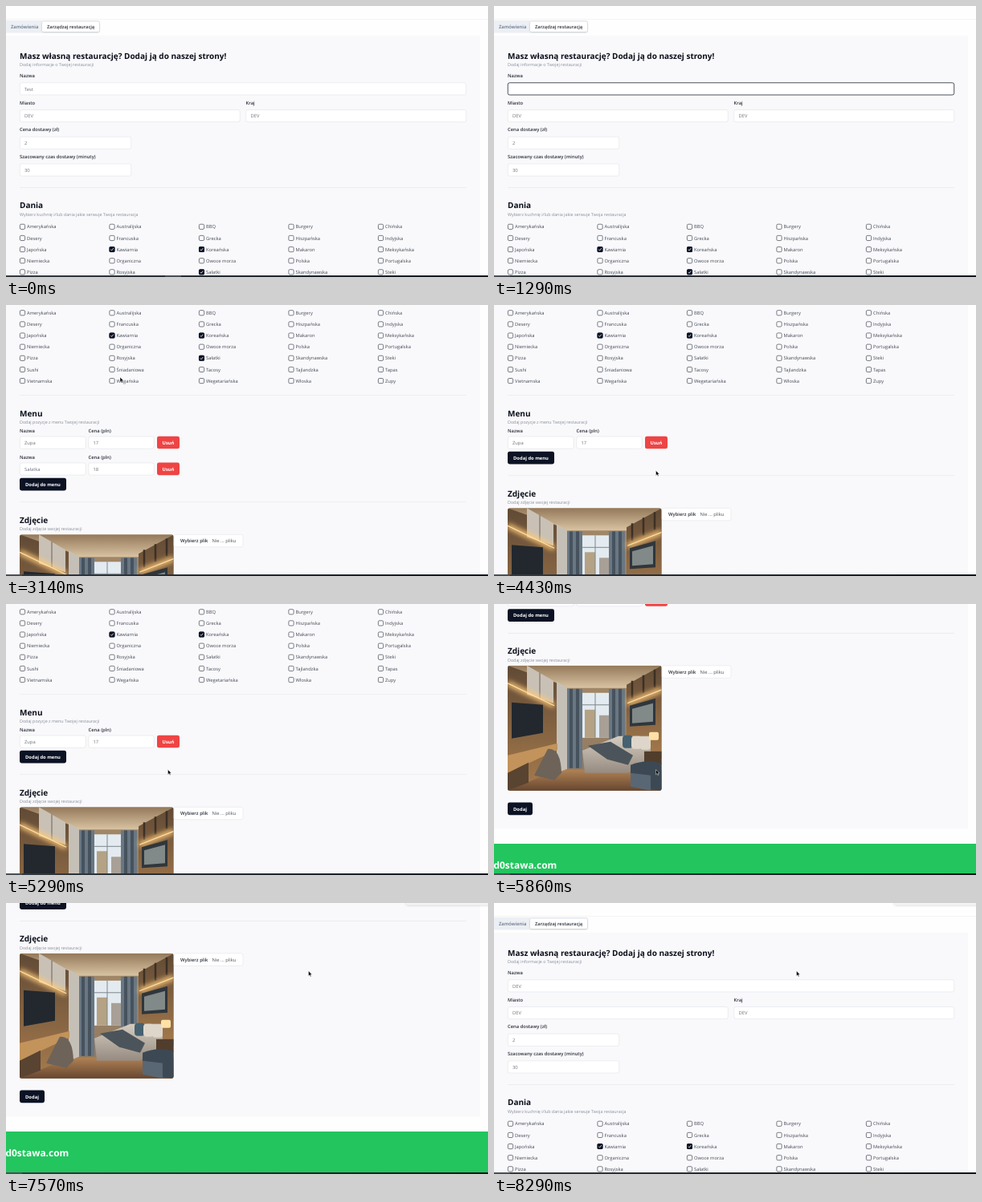
Write an HTML page that moves like this. It is 600 px wide and 338 px high and loops after 8570 ms.

```html
<!DOCTYPE html>
<html lang="pl">
<head>
<meta charset="utf-8">
<style>
html, body { margin: 0; width: 100%; height: 100%; overflow: hidden; background: #fefefe; }
svg { display: block; width: 600px; height: 338px; }
text { font-family: "Open Sans", "Noto Sans", sans-serif; text-rendering: geometricPrecision; white-space: pre; }
</style>
</head>
<body>
<svg id="stage" viewBox="0 0 600 338"></svg>
<script>
const LOOP = 8570, FPS = 7, DARK = '#0b1224', INK = '#2b303a', GREY = '#6c727c', LINE = '#e3e5ea';

const rect = (x, y, w, h, fill, r = 0, extra = '') =>
  `<rect x="${x}" y="${y}" width="${w}" height="${h}" rx="${r}" fill="${fill}" ${extra}/>`;
const text = (x, y, s, fill = INK, size = 5.8, weight = 400, extra = '') =>
  `<text x="${x}" y="${y}" fill="${fill}" font-size="${size}" font-weight="${weight}" ${extra}>${s}</text>`;
const shape = (d, fill) => `<path d="${d}" fill="${fill}"/>`;
const stroke = (d, color, w, extra = '') =>
  `<path d="${d}" fill="none" stroke="${color}" stroke-width="${w}" ${extra}/>`;
const repeat = (n, make) => Array.from({ length: n }, (_, i) => make(i)).join('');
const gradient = (id, from, to, across = 0) =>
  `<linearGradient id="${id}" x2="${across}" y2="${1 - across}">
    <stop stop-color="${from}"/><stop offset="1" stop-color="${to}"/></linearGradient>`;

const label = (x, y, s) => text(x, y, s, INK, 5.85, 600);
const heading = (y, title, note) =>
  text(17, y, title, '#0b0f1a', 10, 700) + text(17, y + 9.3, note, '#858c99', 5.35);
const divider = y => rect(17, y, 556, .6, LINE);
const input = (x, y, w, s, id = 'plain') =>
  rect(x + .25, y + .25, w - .5, 15.2, '#fff', 2.3, `stroke="${LINE}" stroke-width=".7" class="${id}"`) +
  text(x + 6, y + 10, s, GREY, 5.8, 400, `class="${id}-text"`);
const field = (x, y, w, name, value, id) => label(x, y, name) + input(x, y + 6.5, w, value, id);
const button = (x, y, w, s, fill) =>
  rect(x, y, w, 15.6, fill, 2.4) +
  text(x + w / 2, y + 9.9, s, '#fff', 5.8, 700, 'text-anchor="middle"');

const kitchens = `Amerykańska,Australijska,BBQ,Burgery,Chińska,Desery,Francuska,Grecka,Hiszpańska,Indyjska,
Japońska,Kawiarnia,Koreańska,Makaron,Meksykańska,Niemiecka,Organiczna,Owoce morza,Polska,Portugalska,
Pizza,Rosyjska,Sałatki,Skandynawska,Steki,Sushi,Śniadaniowa,Tacosy,Tajlandzka,Tapas,
Vietnamska,Wegańska,Wegetariańska,Włoska,Zupy`.replace(/\n/g, '').split(',');

function checkbox(name, i) {
  const x = 17 + i % 5 * 111.5, y = 271.8 + Math.floor(i / 5) * 14.13;
  const on = ['Kawiarnia', 'Koreańska', 'Sałatki'].includes(name);
  const mark = on ? `<g id="${name}">` + rect(x, y, 7, 7, DARK, 1.5) +
    stroke(`M${x + 1.8} ${y + 3.6}l1.2 1.3 2.3-2.8`, '#fff', .8) + '</g>' : '';
  return rect(x + .4, y + .4, 6.2, 6.2, '#fff', 1.4, 'stroke="#3b414e" stroke-width=".7"') +
    mark + text(x + 9, y + 5.6, name, '#444a55');
}

const menuRow = (y, dish, price) =>
  label(17, y, 'Nazwa') + label(102.5, y, 'Cena (pln)') +
  input(17, y + 4.7, 82.5, dish) + input(102.5, y + 4.7, 82, price) +
  button(188, y + 4.6, 28, 'Usuń', '#ef4444');

// Flat view of a bedroom, 191.5 x 156
const curtain = (x, h) => repeat(5, i => rect(x + i * 4, 29, 4, h, i % 2 ? '#46525d' : '#697783'));
const glow = d => stroke(d, '#ffc978', 6, 'filter="url(#blur)"') + stroke(d, '#ffe2a8', 1.2);
const room = () =>
  rect(0, 0, 192, 156, 'url(#wall)') +
  shape('M0 0H192L148 28H72Z', 'url(#ceiling)') +
  rect(0, 130, 192, 26, 'url(#floor)') +
  curtain(73, 99) + curtain(126, 66) +
  rect(93, 34, 33, 56, '#e3ebf0') + rect(96, 55, 13, 35, '#b5a284') + rect(114, 62, 12, 28, '#a8a096') +
  stroke('M109 34V90M93 49H126', '#7d868b', 1) +
  shape('M0 0L62 22V130L0 156Z', 'url(#wood)') +
  shape('M24 0L57 19V47L24 36Z', '#c9c1b5') + stroke('M40 9V42', '#6a6259', 1) +
  glow('M0 22L58 50') +
  shape('M61 20L74 28V129L61 134Z', '#c5c0b7') +
  shape('M5 46L44 49V84L5 91Z', '#22282e') +
  shape('M0 112L62 97V105L0 134Z', '#c2935b') + shape('M0 134L26 121V146L0 156Z', '#594331') +
  shape('M50 104Q66 102 67 134L58 143 33 137Z', '#6d6359') +
  shape('M192 0L148 24V103L192 116Z', 'url(#wood)') +
  repeat(3, i => stroke(`M${155 + i * 14} ${19 - i * 7}v22`, '#3d3024', 2.5)) +
  glow('M149 47L192 30') +
  shape('M152 50L184 41V74L152 76Z', '#30363b') + shape('M155 54L181 47V70L155 72Z', '#818989') +
  shape('M93 106L138 88H178V116L150 134H96Z', 'url(#linen)') +
  shape('M100 100L128 95 156 112 150 124 124 117Z', '#4c545b') +
  repeat(3, i => rect(143 + i * 11, 87 + i, 13, 16, i ? '#ded6ca' : '#466170', 4)) +
  rect(176, 83, 12, 10, '#ffe1a6', 2) + rect(170, 107, 22, 16, '#513d2c') +
  shape('M153 124Q172 116 192 122V156L153 151Z', '#3c4954') +
  shape('M153 134L178 137V156L153 151Z', '#596774');

const form =
  rect(0, 16.3, 600, .6, '#eeeff1') +
  rect(-6, 18, 123, 15.4, '#eceff3', 2.5) +
  rect(45, 19.5, 71, 12.6, '#fff', 2, 'filter="url(#soft)"') +
  text(6, 27.8, 'Zamówienia', '#64748b', 5.85, 600) +
  text(51, 27.8, 'Zarządzaj restauracją', INK, 5.75, 600) +
  rect(-5, 37, 595, 1200, '#f9f9fb', 3) +
  heading(66, 'Masz własną restaurację? Dodaj ją do naszej strony!', 'Dodaj informacje o Twojej restauracji') +
  field(17, 89, 556, 'Nazwa', '', 'name') + rect(22.5, 99.5, 12, 8, '#a9cdfa', 0, 'id="selection"') +
  field(17, 122.7, 274.5, 'Miasto', 'DEV') + field(298.5, 122.7, 274.5, 'Kraj', 'DEV') +
  field(17, 156.4, 139, 'Cena dostawy (zł)', '2') +
  field(17, 190.1, 139, 'Szacowany czas dostawy (minuty)', '30') +
  divider(226.4) +
  heading(252.2, 'Dania', 'Wybierz kuchnię i/lub dania jakie serwuje Twoja restauracja') +
  kitchens.map(checkbox).join('') +
  divider(378) +
  heading(404.2, 'Menu', 'Dodaj pozycje z menu Twojej restauracji') +
  menuRow(424.6, 'Zupa', '17');

const lower =
  button(17, 481.3, 58, 'Dodaj do menu', DARK) + divider(511) +
  heading(537.2, 'Zdjęcie', 'Dodaj zdjęcie swojej restauracji') +
  `<g transform="translate(17 551.8)" clip-path="url(#frame)">${room()}</g>` +
  rect(209, 551.8, 86, 15.5, '#fff', 2.3, `stroke="${LINE}" stroke-width=".6"`) +
  label(217, 561.8, 'Wybierz plik') + text(256.5, 561.8, 'Nie ... pliku', '#4d535e') +
  button(17, 722.6, 31, 'Dodaj', DARK) +
  rect(0, 755.3, 600, 300, '#fefefe') + rect(0, 774, 600, 300, '#22c55e') +
  text(-.5, 804.8, 'd0stawa.com', '#fff', 11.95, 700);

const stage = document.getElementById('stage');
stage.innerHTML = `<defs>
  <clipPath id="frame"><rect width="191.5" height="156.3" rx="3"/></clipPath>
  <filter id="soft" x="-10%" y="-60%" width="120%" height="220%">
    <feDropShadow dx="0" dy=".4" stdDeviation=".8" flood-opacity=".22"/></filter>
  <filter id="blur" x="-20%" y="-40%" width="140%" height="180%"><feGaussianBlur stdDeviation="3"/></filter>
  ${gradient('wall', '#a58a69', '#8d7760')}${gradient('ceiling', '#94795a', '#d8c3a2')}
  ${gradient('floor', '#b08254', '#674630')}${gradient('wood', '#604a36', '#a77b4d')}
  ${gradient('linen', '#d5ccc0', '#968b80')}${gradient('bar', '#343a40', '#10161d', 1)}
  </defs>
  <g id="page">${form}<g id="second">${menuRow(457.5, 'Sałatka', '18')}</g><g id="lower">${lower}</g></g>
  ${rect(498, -12, 110, 14.4, '#f3f3f5', 2, 'id="toast" filter="url(#soft)"')}
  ${rect(0, 336, 600, 2, 'url(#bar)')}${rect(0, 336.2, 20, 1.8, '#4b5259', 0, 'id="task"')}
  <g id="cursor">
    <path id="arrow" d="M0 0V6.2L1.5 4.9 2.5 7.1 3.5 6.6 2.5 4.5H4.4Z" fill="#000" stroke="#fff" stroke-width=".45"/>
    <path id="beam" d="M-1.3-3.5H1.3M0-3.5V3.2M-1.3 3.2H1.3" stroke="#222" stroke-width=".9"/>
  </g>`;

const $ = s => stage.querySelector(s);
const show = (s, on) => $(s).setAttribute('visibility', on ? 'visible' : 'hidden');
const move = (s, x, y) => $(s).setAttribute('transform', `translate(${x} ${y})`);
const nameBox = $('.name'), nameText = $('.name-text');
nameBox.after($('#selection'));

const ease = p => p * p * (3 - 2 * p);
const progress = (t, from, to) => ease(Math.min(1, Math.max(0, (t - from) / (to - from))));

// Each leg eases from the last place to [x, y] between two times
const follow = (t, start, legs) => legs.reduce(([x, y], { from, to, at }) => {
  const p = progress(t, from, to);
  return [x + (at[0] - x) * p, y + (at[1] - y) * p];
}, start);

const pointerLegs = [
  { from: 0, to: 710, at: [38, 104] },        // name field
  { from: 710, to: 1000, at: [23, 68] },      // drag to select
  { from: 2290, to: 2570, at: [109, 107.7] },
  { from: 2570, to: 2860, at: [142, 90] },
  { from: 3140, to: 3570, at: [242, 65] },    // checkbox
  { from: 3860, to: 4430, at: [201.5, 206.5] }, // remove dish
  { from: 6000, to: 6570, at: [34, 241] },    // submit
  { from: 7000, to: 7430, at: [376.5, 84.8] },
];
const scrollTop = t =>
  265.5 * progress(t, 2570, 3140) + 176.5 * progress(t, 5430, 5860) +
  14 * progress(t, 5860, 6000) - 456 * progress(t, 7570, 8140);

function draw(now) {
  const step = Math.floor((now % LOOP + 5) * FPS / 1000) % 60;
  const t = Math.round(step * 100 / FPS) * 10;
  const within = (a, b) => t >= a && t < b;

  move('#page', 0, -scrollTop(t));
  move('#lower', 0, t < 4430 ? 0 : -33);
  show('#second', t < 4430);
  show('#Sałatki', t < 3710);

  const typed = t < 1710 ? 0 : t < 2000 ? 1 : t < 2140 ? 2 : 3;
  nameText.textContent = t < 1290 ? 'Test' : 'DEV'.slice(0, typed);
  const focus = within(710, 3570);
  nameBox.setAttribute('stroke', focus ? '#4b515c' : LINE);
  nameBox.setAttribute('stroke-width', focus ? 1 : .7);
  show('#selection', within(860, 1290));

  move('#cursor', ...follow(t, [208, 340], pointerLegs));
  const typing = within(1290, 2430), beam = within(710, 1290) || within(2430, 2710);
  show('#beam', beam);
  show('#arrow', !beam && !typing);
  show('#toast', t >= 7000);
  move('#task', t < 290 ? 198 : 0, 0);
}

function tick() {
  draw(performance.now());
  requestAnimationFrame(tick);
}
tick();
</script>
</body>
</html>
```
